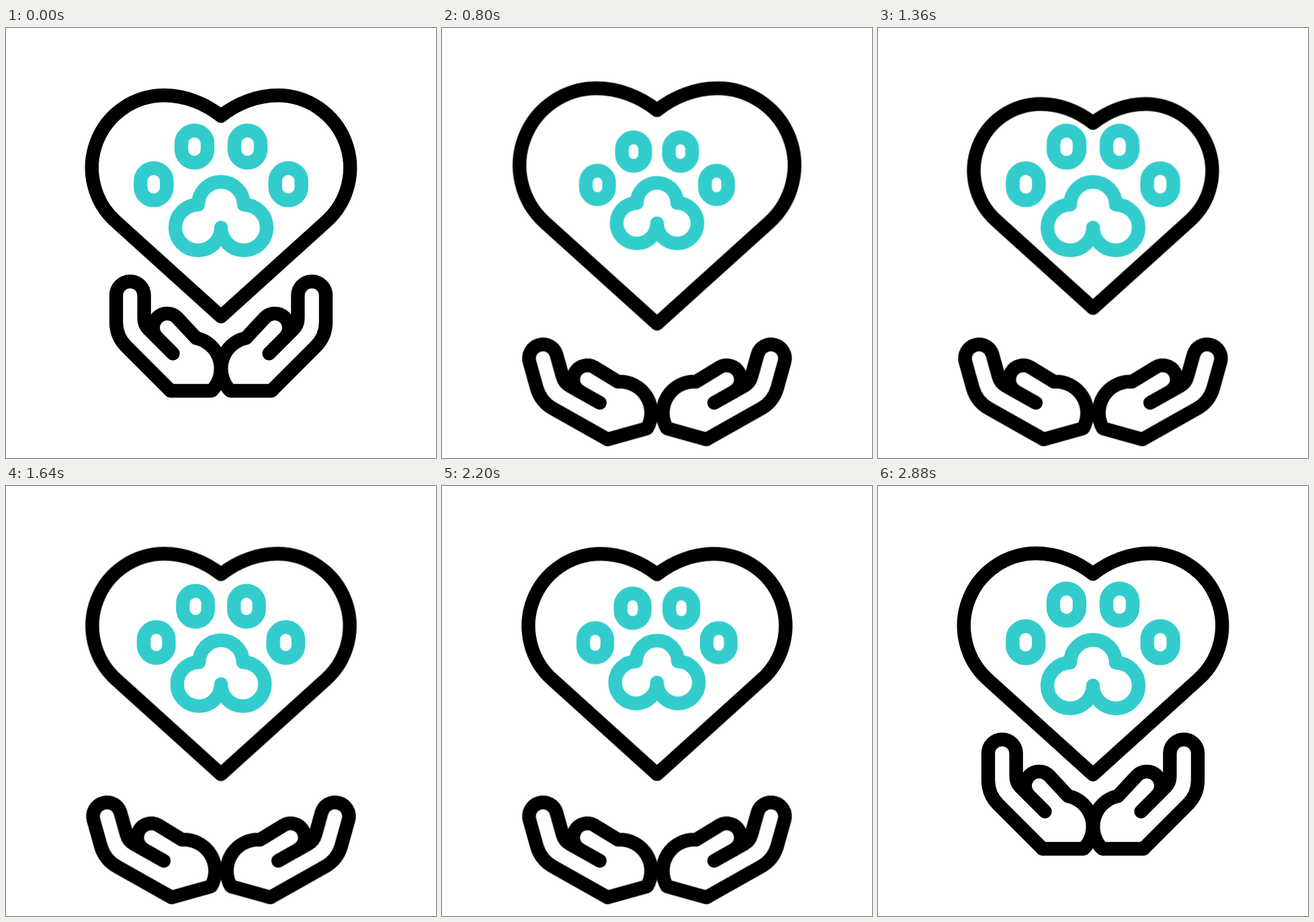
Animation, 640 px wide and 640 px high, one loop 3000 ms. Source, as an HTML page without scripts:

```html
<!DOCTYPE html>
<html lang="en">
<head>
<meta charset="utf-8">
<title>Caring hands</title>
<style>
  html, body { margin: 0; width: 100%; height: 100%; overflow: hidden; background: #fff; }
  svg { display: block; width: 100%; height: 100%; }
  svg * { vector-effect: non-scaling-stroke; }
  .ink { fill: none; stroke: #000; stroke-width: 20.4; stroke-linecap: round; stroke-linejoin: round; }
  .heart, .paw, .hand { animation: 3s cubic-bezier(.37, 0, .63, 1) infinite; }
  .heart { transform-origin: 320px 265px; animation-name: beat; }
  .paw { transform-origin: 320px 241.5px; stroke: #3cc; animation-name: shrink; }
  .hand { transform-origin: 245px 540px; animation-name: open; }

  @keyframes beat {
    0%, 6.667%, 96%, 100% { transform: scale(1); }
    16%, 46.667%, 81.333% { transform: scale(.92); }
    30.667%, 64% { transform: scale(1.094); }
  }
  @keyframes shrink {
    0%, 6.667%, 46.667%, 83.667%, 100% { transform: scale(1); }
    28.667%, 67.333% { transform: scale(.882); }
  }
  @keyframes open {
    0%, 6.667%, 88.667%, 100% { transform: translate(0, 0) rotate(0deg); }
    23%, 73.333% { transform: translate(1.5px, 72.3px) rotate(-15.6deg); }
  }
</style>
</head>
<body>
<svg viewBox="0 0 640 640">
  <defs>
    <g id="hand">
      <path d="M245 540H306A46.5 46.5 0 0 0 283 461.5L254.8 431.2A21 21 0 0 0 225 461"/>
      <path d="M245 540L179 474A51 51 0 0 1 164 438V398A20.8 20.8 0 0 1 205.6 398V432Q205.6 441.6 212 448L248.5 484.5"/>
    </g>
    <rect id="toe" x="-19.5" y="-24" width="39" height="48" rx="19.5"/>
  </defs>
  <g class="ink">
    <path class="heart" d="M320 131C296 112 266 100.3 235.5 100.3A107.7 107.7 0 0 0 163.4 288L320 429.5L476.6 288A107.7 107.7 0 0 0 404.5 100.3C374 100.3 344 112 320 131Z"/>
    <g class="paw">
      <path d="M320 297A34 34 0 1 1 286 263A34 34 0 0 1 354 263A34 34 0 1 1 320 297Z"/>
      <use href="#toe" x="219.8" y="232.5"/>
      <use href="#toe" x="280.5" y="176.5"/>
      <use href="#toe" x="359.5" y="176.5"/>
      <use href="#toe" x="420.2" y="232.5"/>
    </g>
    <use class="hand" href="#hand"/>
    <g transform="matrix(-1 0 0 1 640 0)"><use class="hand" href="#hand"/></g>
  </g>
</svg>
</body>
</html>
```
